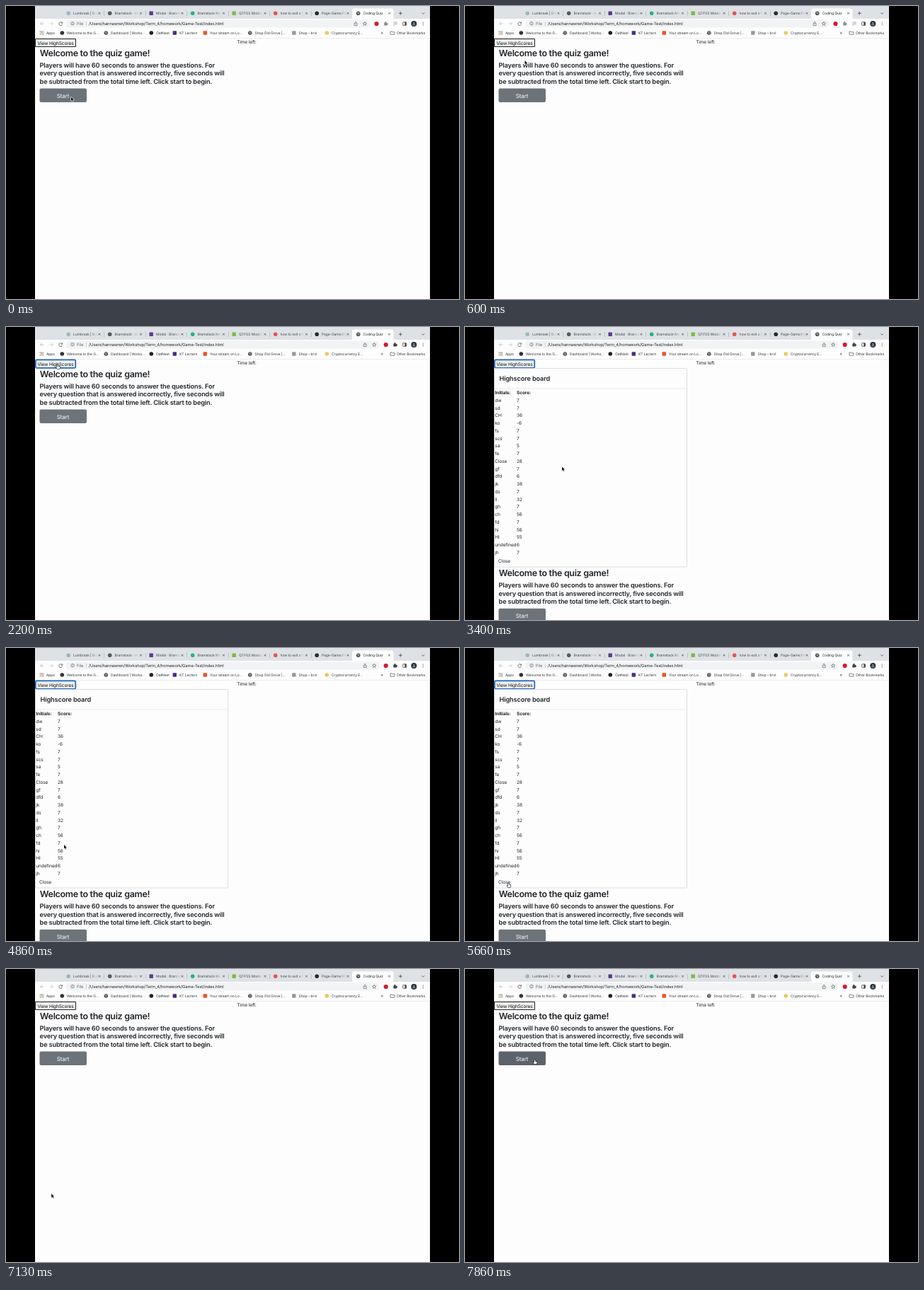
An HTML page with a canvas for the animation above (8000 ms loop, 640 by 414 pixels).

```html
<!DOCTYPE html>
<html lang="en">
<head>
<meta charset="utf-8">
<title>Coding Quiz</title>
<style>
html, body { margin: 0; width: 100%; height: 100%; overflow: hidden; background: #000; }
canvas { display: block; width: 640px; height: 414px; }
</style>
</head>
<body>
<canvas id="stage" width="640" height="414"></canvas>
<script>
const ctx = document.getElementById('stage').getContext('2d');
const LOOP = 8000, OPEN = 2330, SHUT = 6730, VIEW_FOCUS = 2130, CLOSE_FOCUS = 6400;
const MEDIA_END = 930, SHIFT = 281.2, PAGE = '#fdfdfd';

const tabs = [
  ['Lumbrask | Buil', '#9ab9bd', 'dot'], ['Bramstack · mo', '#555a60', 'dot'],
  ['Modal · Bramst', '#5b3b8c', 'box'], ['Bramstack Mo', '#24b28c', 'dot'],
  ['Q7.FSS Modal', '#76bf3f', 'box'], ['how to exit a f', '#e2574c', 'dot'],
  ['Page-Game/RE', '#24292f', 'dot'], ['Coding Quiz', '#444', 'globe']
];
const bookmarks = [
  [57, 'Apps', '', 'grid'], [86, 'Welcome to the G...', '#333', 'dot'],
  [148, 'Dashboard | Works...', '#444', 'globe'], [212, 'OatNest', '#222', 'dot'],
  [245, 'KT Lectern', '#4b2e83', 'box'], [288, 'Your stream on Lo...', '#f4511e', 'box'],
  [351.5, 'Shop Old Grove |...', '#444', 'globe'], [413.5, 'Shop – brvl', '#999', 'box'],
  [460, 'Cryptocurrency E...', '#f0c75e', 'dot']
];
const scores = ('dw 7,sd 7,CH 36,ko -6,fs 7,scs 7,sa 5,fe 7,Close 28,gf 7,dfd 6,jk 38,ds 7,ll 32,' +
  'gh 7,ch 56,fd 7,hi 56,HI 55,undefined 6,jh 7').split(',').map(row => row.split(' '));
const intro = [
  'Players will have 60 seconds to answer the questions. For',
  'every question that is answered incorrectly, five seconds will',
  'be subtracted from the total time left. Click start to begin.'
];
// time, x, y of the pointer's hot spot
const track = [
  [60, 92, 128.5], [860, 82, 60], [930, 82, 60], [1060, 80, 53], [1730, 80, 53], [2060, 73, 53],
  [3130, 73, 53], [3400, 137, 197.5], [3660, 137, 197.5], [3930, 84, 275], [4800, 84, 275],
  [4860, 82, 278], [5260, 64, 333], [5400, 64, 333], [5460, 62.5, 332.5], [5600, 62.5, 332.5],
  [5660, 61.5, 332], [7000, 61.5, 332], [7800, 98.5, 128]
];

function text(str, x, y, size, color = '#212529', weight = 400, spacing = -0.015) {
  ctx.font = `${weight} ${size}px Inter, "Open Sans", sans-serif`;
  ctx.letterSpacing = size * spacing + 'px';
  ctx.textRendering = 'geometricPrecision';
  ctx.fillStyle = color;
  ctx.fillText(str, x, y);
}
function rect(x, y, w, h, color, r = 0) {
  ctx.fillStyle = color;
  ctx.beginPath();
  ctx.roundRect(x, y, w, h, r);
  ctx.fill();
}
function frame(x, y, w, h, color, width = 1, r = 0) {
  ctx.strokeStyle = color;
  ctx.lineWidth = width;
  ctx.beginPath();
  ctx.roundRect(x, y, w, h, r);
  ctx.stroke();
}
function dot(x, y, r, color) {
  ctx.fillStyle = color;
  ctx.beginPath();
  ctx.arc(x, y, r, 0, 7);
  ctx.fill();
}
function path(d, x, y, stroke, width = 0.8, fill) {
  const p = new Path2D(d);
  ctx.save();
  ctx.translate(x, y);
  ctx.lineWidth = width;
  ctx.lineJoin = 'round';
  if (stroke) { ctx.strokeStyle = stroke; ctx.stroke(p); }
  if (fill) { ctx.fillStyle = fill; ctx.fill(p); }
  ctx.restore();
}
function icon(kind, x, y, color) {
  if (kind === 'box') rect(x - 2.7, y - 2.7, 5.4, 5.4, color, 0.6);
  else if (kind === 'grid') {
    const hues = ['#e0503f', '#3f83f0', '#3aa757', '#f0b428'];
    for (let i = 0; i < 9; i++) rect(x - 2.6 + i % 3 * 2, y - 2.6 + (i / 3 | 0) * 2, 1.3, 1.3, hues[i % 4]);
  } else {
    dot(x, y, 2.8, color);
    if (kind === 'globe') path('M-2 -.8Q-.5 -2 0 -.4T-1 1M.6 -1.8L1.8 -.4M.6 1.2L1.6 .6', x, y, '#ddd', 0.8);
  }
}

function drawTabs() {
  rect(41, 0, 558, 18, '#dee1e6');
  rect(489, 3.5, 58.5, 16, PAGE, 3);
  tabs.forEach(([label, color, kind], i) => {
    const x = 95 + 58.5 * i, active = i === 7;
    icon(kind, x - 6.8, 10.2, color);
    ctx.save();
    ctx.beginPath();
    ctx.rect(x, 2, 33.5, 15);
    ctx.clip();
    text(label, x, 12, 5, active ? '#222' : '#454a50');
    if (!active) {
      const fade = ctx.createLinearGradient(x + 25, 0, x + 33.5, 0);
      fade.addColorStop(0, '#dee1e600');
      fade.addColorStop(1, '#dee1e6');
      ctx.fillStyle = fade;
      ctx.fillRect(x + 25, 3, 9, 14);
    }
    ctx.restore();
    path('M-1.4 -1.4L1.4 1.4M1.4 -1.4L-1.4 1.4', x + 37, 10.3, '#444', 0.7);
    if (i < 6) rect(x + 43.5, 7, 0.5, 7, '#9ca1a8');
  });
  path('M-2.4 0H2.4M0 -2.4V2.4', 557.3, 10.3, '#444');
  path('M-1.8 -.9L0 .9L1.8 -.9', 589.3, 10.4, '#444');
}

// While the media control is shown, the icons left of it make room.
function drawActions(media) {
  const dx = media ? -13.2 : 0, ink = media ? '#8a8e93' : '#3a3e43';
  path('M-1 -.6H-2V2.6H2V-.6H1M0 1V-2.7M-1.2 -1.6L0 -2.8L1.2 -1.6', 507.2 + dx, 25, '#555', 0.6);
  path('M0 -2.7L.8 -.8L2.7 -.7L1.2 .6L1.7 2.5L0 1.4L-1.7 2.5L-1.2 .6L-2.7 -.7L-.8 -.8Z', 520.2 + dx, 24.9, '#555', 0.6);
  dot(536.7 + dx, 25, 3.1, '#d6192f');
  rect(547.4 + dx, 23.4, 4.4, 4.2, ink, 0.5);
  dot(549.4 + dx, 23, 1.1, ink);
  dot(552 + dx, 25.5, 1.1, ink);
  if (media) path('M-2.6 -2H2.4M-2.6 0H1M-2.6 2H0M2 -1.4V1.6', 550, 25, ink, 0.7);
}

function drawToolbar(media) {
  rect(41, 18, 558, 27.5, PAGE);
  rect(84.5, 19.5, media ? 430 : 443, 11, '#f1f3f4', 5.5);
  path('M2.5 0H-2.5M-.2 -2.3L-2.5 0L-.2 2.3', 51, 25, '#b5b8bc');
  path('M-2.5 0H2.5M.2 -2.3L2.5 0L.2 2.3', 64, 25, '#c4c7ca');
  path('M2 -1.2A2.4 2.4 0 1 0 2.3 .8M2.4 -2.6V-.8H.5', 77.2, 25, '#555');
  path('M2.3 0A2.3 2.3 0 1 1 -2.3 0A2.3 2.3 0 1 1 2.3 0M0 -.3V1.3M0 -1.3V-.7', 94, 24.7, '#555', 0.6);
  text('File', 100, 26.6, 5.8, '#5f6368');
  rect(113, 22, 0.6, 6, '#b0b3b7');
  text('/Users/hannawren/Workshop/Term_4/homework/Game-Test/index.html', 117, 26.6, 5.8, '#222');

  drawActions(media);
  frame(560.7, 22.7, 4.8, 4.6, '#444', 0.8, 0.5);
  rect(563.4, 22.7, 2.1, 4.6, '#444');
  dot(576.3, 25, 4, '#26323a');
  dot(576.3, 24.2, 1.2, '#84929a');
  rect(574.2, 25.8, 4.2, 1.4, '#84929a', 0.7);
  for (const dy of [-2, 0, 2]) dot(589.3, 25 + dy, 0.6, '#444');

  for (const [x, label, color, kind] of bookmarks) {
    icon(kind, x - 6.7, 38, color);
    text(label, x, 39.8, 5, '#303438');
  }
  text('»', 529.5, 39.7, 6, '#444');
  path('M-3 -2H-.8L0 -1.2H3V2.2H-3Z', 546, 38, '#555', 0.7);
  text('Other Bookmarks', 552, 39.8, 5, '#303438');
  rect(41, 45, 558, 0.5, '#dcdee1');
}

function drawViewButton(focused) {
  rect(41, 46, 58, 12, '#efefef', 1);
  if (focused) frame(41.9, 46.4, 56.4, 11.4, '#1c68c4', 1.7, 1.5);
  else frame(41.5, 46.5, 57, 11, '#222');
  text('View HighScores', 44.5, 54.5, 6.5, '#111');
}

function drawBoard(closeGlow) {
  rect(41.5, 58.5, 272, 280.5, PAGE);
  frame(41.5, 58.5, 272, 280.5, '#d6d7d9', 0.8, 1);
  rect(42, 86.5, 271.5, 0.7, '#e4e6e8');
  text('Highscore board', 48.5, 76.1, 9.2, '#212529', 600);
  text('Initials:', 42.2, 95, 6.5, '#212529', 700);
  text('Score:', 73, 95, 6.5, '#212529', 700);
  scores.forEach(([who, score], i) => {
    const y = 105.8 + 10.75 * i;
    text(who, 42.3, y, 6.5);
    text(score, 73, y, 6.5);
  });
  if (closeGlow) {
    ctx.globalAlpha = closeGlow;
    frame(42.1, 323.3, 27.6, 15.4, '#b9d2f8', 1.5, 2);
    ctx.globalAlpha = 1;
  }
  text('Close', 47, 333.3, 6.5);
}

function drawIntro(dy, hover) {
  text('Welcome to the quiz game!', 47.8, 70.6 + dy, 12.5, '#212529', 600, -0.027);
  intro.forEach((line, i) => text(line, 47.6, 86.7 + 11.75 * i + dy, 9.2, '#212529', 600, -0.017));
  rect(47.5, 116.5 + dy, 66.5, 19.5, hover ? '#5c636a' : '#6c747a', 2);
  text('Start', 71.8, 129.5 + dy, 8, '#fff');
}

function pointerAt(t) {
  const next = track.findIndex(p => p[0] > t);
  if (next === 0) return track[0].slice(1);
  if (next < 0) return track[track.length - 1].slice(1);
  const [t0, x0, y0] = track[next - 1], [t1, x1, y1] = track[next];
  const u = (t - t0) / (t1 - t0), k = u * u * (3 - 2 * u);
  return [x0 + (x1 - x0) * k, y0 + (y1 - y0) * k];
}
function drawPointer(x, y, hand) {
  const shape = hand
    ? 'M-.6 .6Q0 -.2 .6 .6V2.3L2.6 2.9Q3.3 3.2 3.1 4.2L2.6 6.2H-.6L-2.2 4Q-2 3 -.6 3.9Z'
    : 'M0 0V5.6L1.3 4.4L2.2 6.5L3.1 6.1L2.2 4.1H4Z';
  if (hand) path(shape, x, y, '#111', 1.2, '#fff');
  else path(shape, x, y, '#fff', 1.1, '#111');
}

function draw(now) {
  const t = now % LOOP;
  const open = t >= OPEN && t < SHUT;
  const [x, y] = pointerAt(t);
  const overView = y < 58 && x < 98;
  const overClose = open && y > 323 && x < 70;
  const overStart = t > SHUT && y < 136;

  rect(0, 0, 640, 414, '#000');
  ctx.save();
  ctx.beginPath();
  ctx.rect(41, 0, 558, 414);
  ctx.clip();
  rect(41, 0, 558, 414, PAGE);
  drawTabs();
  drawToolbar(t < MEDIA_END);
  text('Time left:', 326.2, 53.4, 6.5);
  drawViewButton(t >= VIEW_FOCUS && t < CLOSE_FOCUS);
  if (open) drawBoard(Math.min(1, Math.max(0, (t - CLOSE_FOCUS) / 150)));
  drawIntro(open ? SHIFT : 0, overStart);
  drawPointer(x, y, overView || overClose || overStart);
  ctx.restore();
  requestAnimationFrame(draw);
}
requestAnimationFrame(draw);
</script>
</body>
</html>
```
